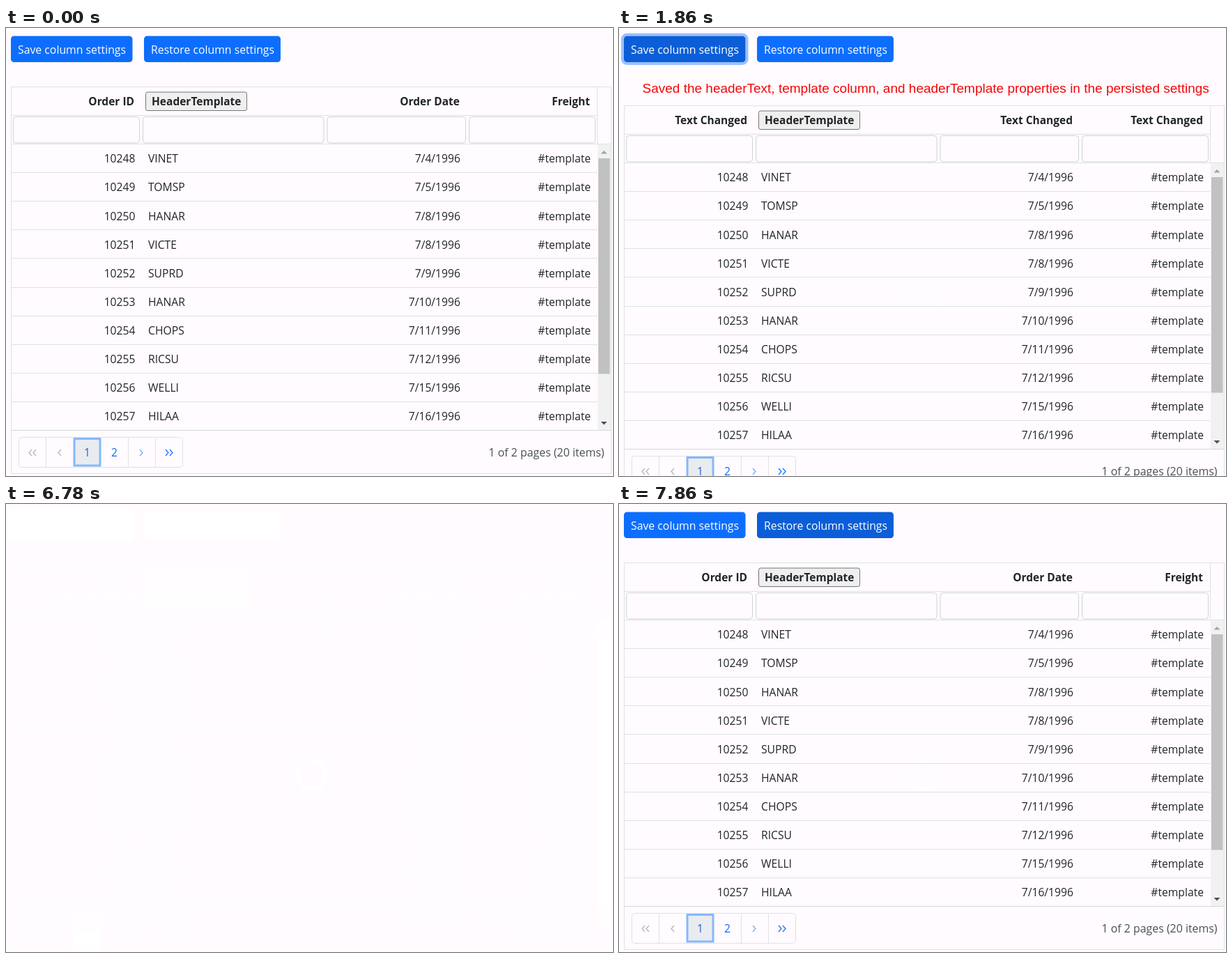
Write an HTML page that moves like this. It is 871 px wide and 643 px high and loops after 8 s.

```html
<!DOCTYPE html>
<html lang="en">
<head>
<meta charset="utf-8">
<title>Grid column settings</title>
<style>
html, body { margin: 0; width: 100%; height: 100%; overflow: hidden; background: #fffbff; }
svg { display: block; width: 871px; height: 643px; }
text { font: 15.7px "Open Sans", "Noto Sans", sans-serif; fill: #212529; }
.end { text-anchor: end; }
.mid { text-anchor: middle; }
.bold { font-weight: 700; font-size: 15.5px; }
.white { fill: #fff; font-size: 15.8px; }
.msg { font: 19px "Liberation Sans", Arial, sans-serif; fill: #f00808; }
.info { font-size: 15.9px; fill: #495057; }
.line { fill: none; stroke: #dee2e6; }
.input { fill: none; stroke: #ced4da; }
.chev { fill: none; stroke-width: 1.2; }

#before, #after, #bar, #save, #ring, #restore, #spin {
  animation: 8s step-end infinite;
}
#before { animation-name: before; }
#after { animation-name: after; }
#bar { animation-name: bar; }
#save { animation-name: save; }
#ring { animation-name: ring; }
#restore { animation-name: restore; }
#spin { animation-name: spin; transform-origin: 439px 389.5px; }

@keyframes before {
  0%, 87.75%, 100% { opacity: 1; filter: none; }
  22.5%, 84.75% { opacity: .6; filter: brightness(0) invert(1); }
  23.25% { opacity: 0; filter: none; }
}
@keyframes after {
  0%, 87.75%, 100% { opacity: 0; filter: none; }
  23.25% { opacity: 1; filter: none; }
  84.75% { opacity: .8; filter: brightness(0) invert(1); }
}
@keyframes bar {
  0%, 23.25%, 87.75%, 100% { filter: none; }
  22.5%, 84.75% { filter: brightness(0) invert(1); }
}
@keyframes save {
  0%, 87.75%, 100% { fill: #0d6efd; stroke: transparent; }
  12.75%, 22.5% { fill: #0b5ed7; stroke: transparent; }
  20.25% { fill: #0a58ca; stroke: #0a53be; }
}
@keyframes ring {
  0%, 87.75%, 100% { opacity: 0; }
  22.5% { opacity: 1; }
}
@keyframes restore {
  0%, 46.5% { fill: #0d6efd; }
  41.25%, 98.25%, 100% { fill: #0b5ed7; }
}
@keyframes spin {
  0%, 100% { opacity: 0; transform: rotate(0deg); }
  22.5% { opacity: 1; transform: rotate(0deg); }
  23.25% { opacity: .6; transform: rotate(20deg); }
  84.75% { opacity: 1; transform: rotate(0deg); }
  85.5% { opacity: 1; transform: rotate(25deg); }
  87% { opacity: 1; transform: rotate(50deg); }
  87.75% { opacity: .6; transform: rotate(75deg); }
}
</style>
</head>
<body>
<svg id="stage" viewBox="0 0 871 643"></svg>
<script>
const ids = ["VINET", "TOMSP", "HANAR", "VICTE", "SUPRD", "HANAR", "CHOPS", "RICSU", "WELLI", "HILAA"];
const days = [4, 5, 8, 8, 9, 10, 11, 12, 15, 16];
const ROW = 41.1;

const text = (x, y, s, cls = "") => `<text x="${x}" y="${y}" class="${cls}">${s}</text>`;
const rect = (x, y, w, h, attrs) => `<rect x="${x}" y="${y}" width="${w}" height="${h}" ${attrs}/>`;
const line = d => `<path class="line" d="${d}"/>`;

// dir is -1 for a chevron pointing left, 1 for right
const chevron = (x, dir, color) =>
  `<path class="chev" stroke="${color}" d="M${x - 2 * dir} 605l${4 * dir} 4.5l${-4 * dir} 4.5"/>`;

function header([id, date, freight]) {
  const inputs = [[10.5, 191.5], [196.5, 456], [461, 659.5], [664.5, 845.5]];
  return line("M7.5 125.5H848.5V84.5V166.5M7.5 166.5H868.5") +
    text(184, 111, id, "end bold") +
    rect(200.5, 92, 145, 26.5, 'rx="2.5" fill="#efefef" stroke="#767676"') +
    text(209, 111, "HeaderTemplate", "bold") +
    text(651, 111, date, "end bold") +
    text(838, 111, freight, "end bold") +
    inputs.map(([a, b]) => rect(a, 127.5, b - a, 37.5, 'rx="4" class="input"')).join("");
}

function rows() {
  return ids.map((name, i) => {
    const y = (193.3 + i * ROW).toFixed(1);
    const edge = Math.round(166 + (i + 1) * ROW) + .5;
    return text(185.5, y, 10248 + i, "end") +
      text(204, y, name) +
      text(652, y, `7/${days[i]}/1996`, "end") +
      text(839, y, "#template", "end") +
      line(`M7.5 ${edge}H848.5`);
  }).join("");
}

function scrollbar() {
  return rect(849, 167, 19, 410, 'fill="#f1f1f1"') +
    rect(850, 187, 16.5, 309.5, 'fill="#c1c1c1"') +
    '<path fill="#a3a3a3" d="M853.5 180.5l4.5-4.5l4.5 4.5z"/>' +
    '<path fill="#505050" d="M853.5 565l4.5 4.5l4.5-4.5z"/>';
}

function pager() {
  const off = "#adb5bd", on = "#0d6efd";
  return '<path fill="none" stroke="#d3d7dc" d="M7.5 577.5H868.5"/>' +
    rect(18.5, 587.5, 235, 43, 'rx="4" class="line"') +
    line("M57.5 588V630M175.5 588V630M214.5 588V630") +
    rect(98, 589.5, 37, 38.5, 'fill="#e9ecef" stroke="#86b7fe" stroke-width="3"') +
    chevron(35, -1, off) + chevron(41, -1, off) + chevron(77, -1, off) +
    `<g style="--c:${on}">` +
    text(116.5, 614.5, 1, "mid").replace("<text", '<text style="fill:#2b5fdc"') +
    text(155.5, 614.5, 2, "mid").replace("<text", `<text style="fill:${on}"`) + "</g>" +
    chevron(194, 1, "#6ea8fe") + chevron(231, 1, on) + chevron(237, 1, on) +
    text(858.5, 615, "1 of 2 pages (20 items)", "end info");
}

const grid = titles => rect(7.5, 84.5, 861, 555, 'class="line"') +
  header(titles) + rows() + scrollbar() + pager();

const changed = "Text Changed";
const note = "Saved the headerText, template column, and headerTemplate properties in the persisted settings";

document.getElementById("stage").innerHTML =
  '<path id="spin" fill="none" stroke="#fff" stroke-width="5" d="M438 369.5A20 20 0 1 1 424.5 375.5"/>' +
  `<g id="before">${grid(["Order ID", "Order Date", "Freight"])}</g>` +
  `<g id="after">${text(33.5, 92.5, note, "msg")}<g transform="translate(0 27)">${grid([changed, changed, changed])}</g></g>` +
  '<g id="bar">' +
  rect(5, 9.5, 178.5, 41.5, 'id="ring" rx="6.5" fill="none" stroke="#98c1fe" stroke-width="4"') +
  rect(7, 11.5, 174.5, 37.5, 'id="save" rx="4.5"') + text(17, 36.5, "Save column settings", "white") +
  rect(198, 11.5, 196, 37.5, 'id="restore" rx="4.5"') + text(208, 36.5, "Restore column settings", "white") +
  "</g>";
</script>
</body>
</html>
```
